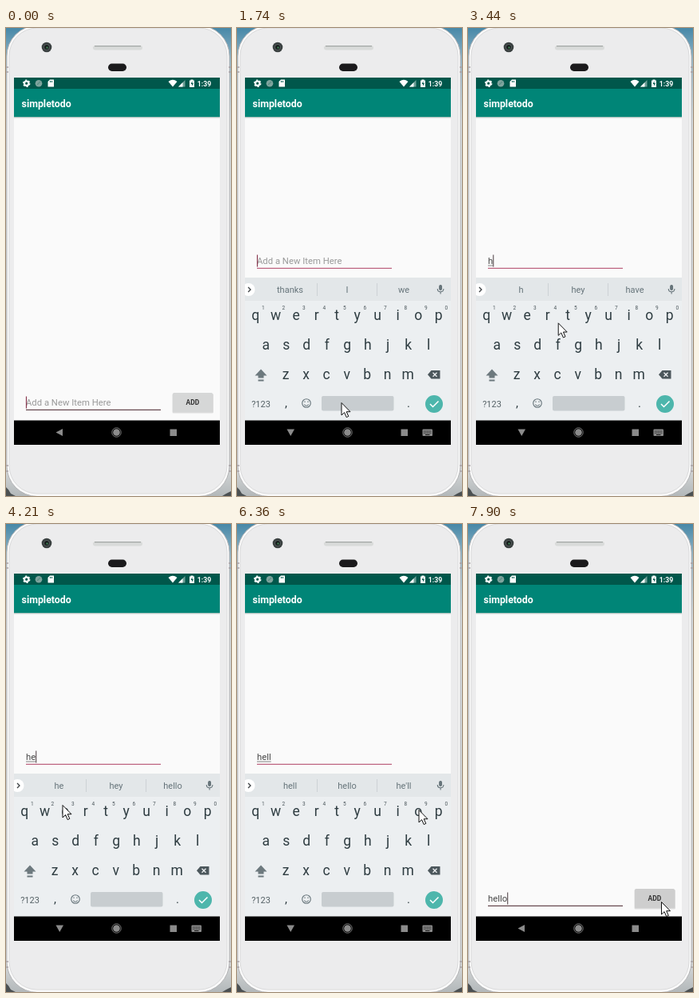
These frames come from a looping animation (282 px wide and 585 px high, 8000 ms). An HTML page:

```html
<!DOCTYPE html>
<html lang="en">
<head>
<meta charset="utf-8">
<title>Todo list on a phone</title>
<style>
html, body { margin: 0; width: 282px; height: 585px; overflow: hidden; }
svg { display: block; font-family: Roboto, sans-serif; }
.mid { text-anchor: middle; }
.bold { font-weight: 700; }
</style>
</head>
<body>
<svg id="stage" width="282" height="585" viewBox="0 0 282 585">
  <defs>
    <linearGradient id="sky" x2="0" y2="1">
      <stop offset="0" stop-color="#4788a8"/><stop offset=".07" stop-color="#94b6c6"/>
      <stop offset=".2" stop-color="#d3d9dc"/><stop offset=".95" stop-color="#cfd2d3"/>
      <stop offset="1" stop-color="#b3b8ba"/>
    </linearGradient>
    <clipPath id="content"><path d="M10 112h258v378.500H10z"/></clipPath>
  </defs>

  <!-- backdrop and phone body -->
  <path fill="url(#sky)" d="M0 0h282v585H0z"/>
  <path fill="#4b5052" d="M0 574l3 3 3 5 6 3H0zM282 579l-6 3-5 3h11z"/>
  <rect x="1" y="-3" width="279" height="588.500" rx="38" fill="#fafafa" stroke="#b4b4b6"/>
  <rect x="4" y="0" width="273" height="582" rx="35" fill="#ececed" stroke="#dadadb"/>
  <path stroke="#a9a3a7" stroke-width="1.500" d="M0 49h3M0 55h3M279 49h3M279 55h3M0 547h3M0 554h3M279 547h3M279 554h3"/>
  <circle cx="51" cy="24" r="6.300" fill="#3a4040"/>
  <circle cx="51" cy="24" r="3.500" fill="#151a1a" stroke="#596262"/>
  <circle cx="51.500" cy="24.500" r="1.300" fill="#3d7850"/>
  <rect x="109" y="22" width="62" height="5.500" rx="2.700" fill="#d9dbda"/>
  <path d="M111 22.700h58" stroke="#a2a6a4" stroke-width="1.300"/>
  <rect x="128" y="44.500" width="23" height="9.500" rx="4.750" fill="#1b1a1c"/>

  <!-- screen -->
  <path fill="#fafafa" d="M10 62h258v459H10z"/>
  <path fill="#e3e7e6" d="M10 112h258v1H10z"/>
  <path fill="#a9c2be" d="M10 111h258v1H10z"/>
  <path fill="#008577" d="M10 76h258v35H10z"/>
  <path fill="#00574b" d="M10 62h258v14H10z"/>
  <g fill="#fff">
    <circle cx="25.700" cy="69.200" r="2.700" fill="none" stroke="#fff" stroke-width="2.200"/>
    <circle cx="25.700" cy="69.200" r="4.100" fill="none" stroke="#fff" stroke-width="1.300" stroke-dasharray="2.150 2.150"/>
    <circle cx="41" cy="69.300" r="4.300" fill="#7fa49e"/>
    <path d="M39 71l4-4" stroke="#5f9087" stroke-width="1.500"/>
    <path d="M55 64.500h5v9h-7.500V67z"/>
    <path stroke="#00574b" d="M55.500 66v2M57.500 66v2"/>
    <path d="M203.500 67q5.500-4.500 11 0l-5.500 6.500z"/>
    <path d="M224.500 65v8.500H216z" fill="#6f9f97"/><path d="M221.500 68v5.500H216z"/>
    <path d="M231.500 64.500h3v1h1.500v8.500h-6v-8.500h1.500z"/>
    <path d="M233.500 66.500l-2 3.500h1.500v2.500l2-3.500h-1.500z" fill="#00574b"/>
    <text x="239.800" y="72.500" font-size="8.700" class="bold">1:39</text>
    <text x="19.500" y="99" font-size="12.400" class="bold">simpletodo</text>
  </g>

  <!-- input row -->
  <g id="add">
    <rect x="208.500" y="457" width="51.500" height="24.500" rx="1.500" fill="#c4c4c4" opacity=".55"/>
    <rect id="button" x="209" y="456" width="50" height="24" rx="1.500"/>
    <text x="234" y="471" font-size="8.500" class="mid bold" fill="#333">ADD</text>
  </g>
  <g id="field">
    <text id="entry" x="25" y="472" font-size="11.300"></text>
    <path id="composing" stroke="#666" stroke-width=".8"/>
    <path id="line" d="M25 477.300h169" stroke-width="1.200"/>
    <path id="caret" stroke-width="1.200"/>
  </g>

  <g clip-path="url(#content)"><g id="keyboard">
    <path fill="#eceff1" d="M10 312h258v179H10z"/>
    <path fill="#e3e7e9" d="M10 312h258v29H10z"/>
    <circle cx="14.500" cy="327" r="8" fill="#fff"/>
    <path d="M14 324l3 3-3 3" fill="none" stroke="#3c4043" stroke-width="1.300"/>
    <path d="M100.500 319v16M175.500 319v16" stroke="#cdd2d5"/>
    <g fill="none" stroke="#66747a" stroke-width="1.100">
      <rect x="253.700" y="321.500" width="2.800" height="6" rx="1.400" fill="#66747a"/>
      <path d="M251.300 326q0 3.800 3.800 3.800t3.800-3.800M255.100 330v2.500"/>
      <circle cx="87" cy="469" r="5.300"/>
      <path d="M84.300 470.500q2.700 3.500 5.400 0M85 466.500v1.500M89 466.500v1.500"/>
    </g>
    <path d="M30 426.500l7.500 8h-4v3h-7v-3h-4zM26.500 439.500h7v2h-7z" fill="#6d797e"/>
    <path d="M243.500 428h11v10.500h-11l-4.500-5.200z" fill="#4c575c"/>
    <path d="M245.500 430.700l5 5m0-5l-5 5" stroke="#eceff1" stroke-width="1.300"/>
    <rect x="106" y="460" width="90.500" height="18.500" rx="2" fill="#c8cdd0"/>
    <circle cx="247" cy="470" r="11" fill="#4db6ac"/>
    <path d="M242 470l3.500 3.500 7-7" fill="none" stroke="#fff" stroke-width="1.500"/>
  </g></g>

  <!-- navigation bar -->
  <path d="M10 490.500h258V521H10z"/>
  <g fill="#8b8b8b">
    <path id="back"/>
    <circle cx="138.500" cy="505.500" r="4.300"/>
    <circle cx="138.500" cy="505.500" r="5.700" fill="none" stroke="#8b8b8b" stroke-width=".9"/>
    <path d="M205.500 501.500h8.500v8.500h-8.500z"/>
    <g id="switcher">
      <rect x="232.500" y="501.500" width="12.500" height="8.500" rx="1"/>
      <path d="M234 504h9.500M234 506.200h9.500" stroke="#111" stroke-dasharray="1.300 .8"/>
      <path d="M236 508.500h5.500" stroke="#111"/>
    </g>
  </g>

  <path id="pointer" d="M0 .5v15.500l3.600-3.400 2.600 6 2.600-1.200-2.600-5.700H11z" fill="#fff" stroke="#111" stroke-width="1"/>
</svg>
<script>
const $ = id => document.getElementById(id);
const set = (el, attrs) => { for (const k in attrs) el.setAttribute(k, attrs[k]); };
const show = (id, on) => set($(id), { visibility: on ? 'visible' : 'hidden' });

function label(text, x, y, size, fill = '#2f3d42') {
  const el = document.createElementNS('http://www.w3.org/2000/svg', 'text');
  set(el, { x, y, 'font-size': size, fill, class: 'mid' });
  el.textContent = text;
  $('keyboard').append(el);
  return el;
}

[['qwertyuiop', 23.2, 364.5], ['asdfghjkl', 36.2, 401.7], ['zxcvbnm', 61.2, 438.7]].forEach(([keys, x, y]) =>
  [...keys].forEach((key, i) => label(key, x + i * 25.5, y, 17.5)));
[...'1234567890'].forEach((d, i) => label(d, 32.8 + i * 25.5, 352, 6.5, '#4c575c'));
label('?123', 30, 473.5, 11, '#566267');
label(',', 61.5, 474, 15);
label('.', 215, 474, 15);
const words = [66.5, 138, 209].map(x => label('', x, 331, 11, '#66747a'));

const LOOP = 8000, OPEN = 1200, CLOSE = 7510;
const typed = [ // time, entry, suggestions
  [0, '', 'thanks', 'I', 'we'],
  [3020, 'h', 'h', 'hey', 'have'],
  [3900, 'he', 'he', 'hey', 'hello'],
  [5300, 'hel', 'hel', 'hello', 'hell'],
  [5650, 'hell', 'hell', 'hello', "he'll"],
  [6700, 'hello', 'hello', 'hell', "he'll"]
];
const path = [ // time, x, y
  [430, 185, 576], [700, 160, 505], [1050, 131, 468], [2050, 131, 468], [2200, 136, 397],
  [2400, 155, 394], [2750, 163.5, 389], [3150, 163.5, 389], [3700, 71, 351], [4220, 71, 351],
  [4520, 233, 411], [4900, 243, 398], [5300, 240.5, 398], [5750, 240.5, 398], [6360, 228, 357],
  [6780, 228, 357], [7280, 242.5, 472], [LOOP, 242.5, 472]
];
const ease = p => { p = Math.min(1, Math.max(0, p)); return p * p * (3 - 2 * p); };

function movePointer(t) {
  show('pointer', t >= path[0][0]);
  const i = path.findIndex(p => p[0] > t);
  if (i < 1) return;
  const [a, b] = [path[i - 1], path[i]];
  const p = ease((t - a[0]) / (b[0] - a[0]));
  const at = k => a[k] + (b[k] - a[k]) * p;
  set($('pointer'), { transform: `translate(${at(1)} ${at(2)})` });
}

function draw(t) {
  const [since, text, ...hints] = typed.findLast(s => s[0] <= t);
  const open = t >= OPEN && t < CLOSE;
  const raised = t >= OPEN + 150 && t < CLOSE + 80;
  const rise = ease((t - OPEN) / 230) - ease((t - CLOSE) / 200);

  set($('keyboard'), { transform: `translate(0 ${179 * (1 - rise)})` });
  show('keyboard', rise > 0);
  words.forEach((w, i) => w.textContent = hints[i]);

  set($('field'), { transform: `translate(0 ${raised ? -177 : 0})` });
  show('add', !raised);
  set($('button'), { fill: t >= 7820 ? '#cecece' : '#d6d7d7' });
  $('entry').textContent = text || 'Add a New Item Here';
  set($('entry'), { fill: text ? '#484848' : '#999' });
  const end = 25 + (text ? $('entry').getComputedTextLength() : 0);
  set($('composing'), { d: `M25 474H${end}` });
  show('composing', text && raised);
  set($('line'), { stroke: raised ? '#bd6480' : '#674a50' });

  const blink = text ? t - since : t + 300;
  set($('caret'), { d: `M${end + .5} 460.500v15`, stroke: text ? '#665a5e' : '#8a3a50' });
  show('caret', Math.floor(blink / 500) % 2 === 0);

  set($('back'), { d: open ? 'M62.500 501.500h9.500l-4.750 8.500z' : 'M71 501v9l-8.500-4.500z' });
  show('switcher', open);
  movePointer(t);
}

const start = performance.now();
(function tick() {
  draw((performance.now() - start) % LOOP);
  requestAnimationFrame(tick);
})();
</script>
</body>
</html>
```
